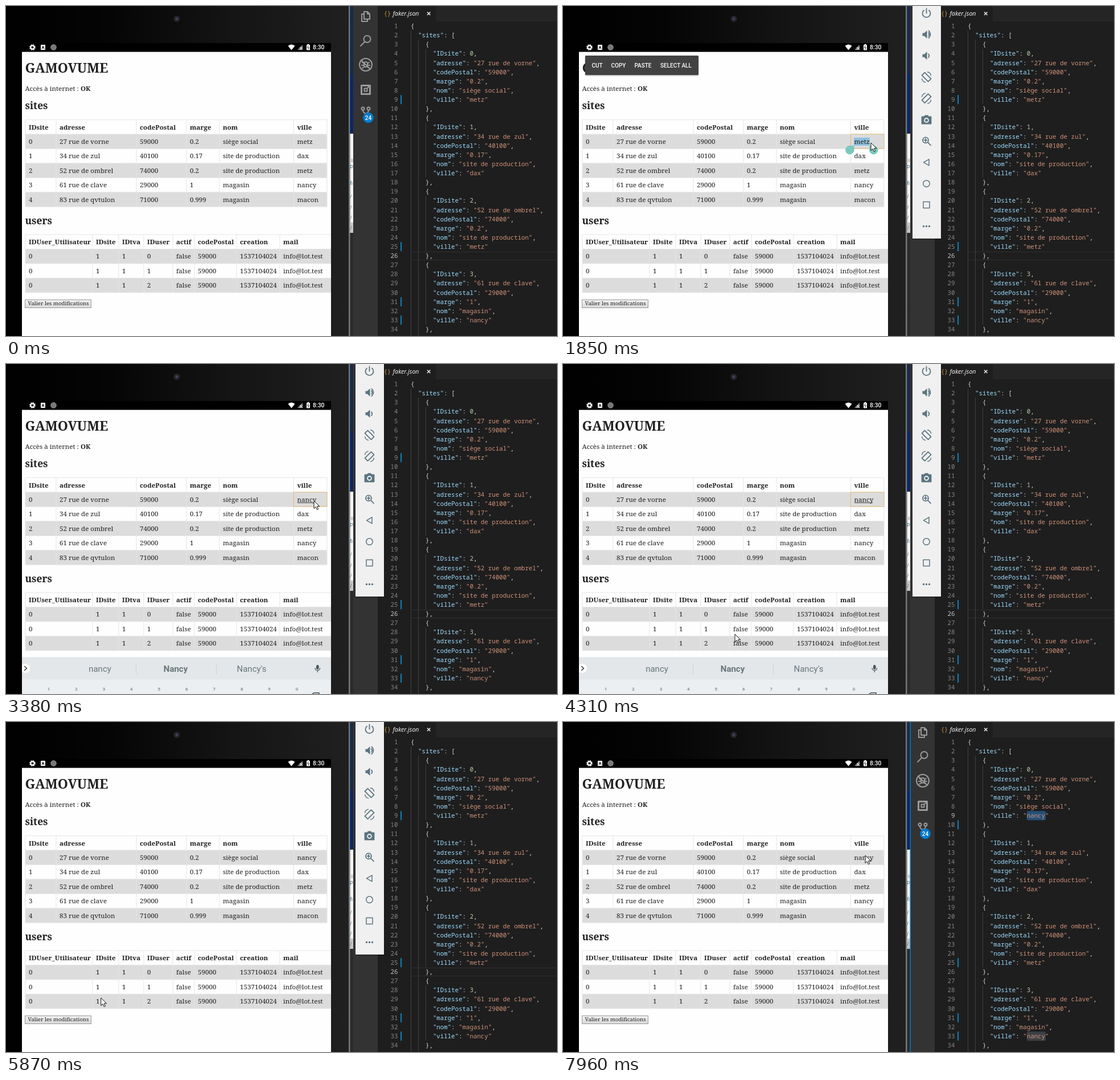
Animation, 968 px wide and 579 px high, one loop 8000 ms. Source, as an HTML page:

```html
<!DOCTYPE html>
<html lang="fr">
<head>
<meta charset="utf-8">
<title>Tablet and editor</title>
<style>
  html, body { margin: 0; width: 100%; height: 100%; overflow: hidden; background: #1e1e1e; }
  svg { display: block; width: 100vw; height: 100vh; }
  text { white-space: pre; }
  .serif { font-family: "Noto Serif", serif; font-size: 11.6px; fill: #212121; }
  .b { font-weight: 700; }
  .h1 { font-size: 23.2px; }
  .h2 { font-size: 17.4px; }
  .ui { font-family: Roboto, sans-serif; }
  .code { font-family: "Noto Sans Mono", monospace; font-size: 10.8px; font-weight: 500; fill: #d4d4d4; }
  .key { fill: #9cdcfe; }
  .str { fill: #ce9178; }
  .num { fill: #b5cea8; }
  .mid { text-anchor: middle; }
  .line { fill: none; stroke-linecap: round; stroke-linejoin: round; }
</style>
</head>
<body>
<svg id="stage" viewBox="0 0 968 579" preserveAspectRatio="none"></svg>
<script>
const DURATION = 8000;
const stage = document.getElementById('stage');
const CHAR = 6.48, LINE = 16.12;
const lineY = n => 35.3 + LINE * (n - 1);

const rect = (x, y, w, h, fill, extra = '') =>
  `<rect x="${x}" y="${y}" width="${w}" height="${h}" fill="${fill}" ${extra}/>`;
const text = (x, y, cls, body, extra = '') =>
  `<text x="${x}" y="${y}" class="${cls}" ${extra}>${body}</text>`;
const path = (d, extra = '') => `<path d="${d}" ${extra}/>`;
const group = (id, body, extra = '') => `<g id="${id}" ${extra}>${body}</g>`;
const at = (x, y, body) => `<g transform="translate(${x} ${y})">${body}</g>`;

const fields = ['IDsite', 'adresse', 'codePostal', 'marge', 'nom', 'ville'];
const sites = [
  [0, '27 rue de vorne', '59000', '0.2', 'siège social', 'metz'],
  [1, '34 rue de zul', '40100', '0.17', 'site de production', 'dax'],
  [2, '52 rue de ombrel', '74000', '0.2', 'site de production', 'metz'],
  [3, '61 rue de clave', '29000', '1', 'magasin', 'nancy'],
  [4, '83 rue de qvtulon', '71000', '0.999', 'magasin', 'macon']
];
const userFields = ['IDUser_Utilisateur', 'IDsite', 'IDtva', 'IDuser', 'actif', 'codePostal', 'creation', 'mail'];
const users = [0, 1, 2].map(i => [0, 1, 1, i, 'false', '59000', '1537104024', 'info@lot.test']);

function table(top, cols, head, rows, idOf = () => '') {
  const step = 25.45, right = cols[cols.length - 1], bottom = top + step * (rows.length + 1);
  let out = '';
  rows.forEach((_, i) => {
    if (i % 2 === 0) out += rect(cols[0], top + step * (i + 1), right - cols[0], step, '#dcdcdc');
  });
  const lines = cols.map(x => `M${x} ${top}V${bottom}`).join('') +
    [head, ...rows].map((_, i) => `M${cols[0]} ${top + step * i}H${right}`).join('') + `M${cols[0]} ${bottom}H${right}`;
  out += path(lines, 'fill="none" stroke="#e5e5e5"');
  [head, ...rows].forEach((row, r) => row.forEach((cell, c) => {
    out += text(cols[c] + 6, top + step * r + 17, r ? 'serif' : 'serif b', cell, idOf(r, c));
  }));
  return out;
}

function tablet() {
  const status =
    rect(28, 65, 543, 16, '#000') +
    at(46.5, 72.5, `<circle r="3.2" fill="none" stroke="#fff" stroke-width="2.2"/><circle r="4.6" fill="none" stroke="#fff" stroke-width="1.6" stroke-dasharray="2 1.6"/>`) +
    rect(61, 68, 8, 9, '#fff', 'rx="1"') + text(65, 75.3, 'ui b mid', 'A', 'font-size="7.5" fill="#000"') +
    `<circle cx="83.5" cy="72.5" r="4.8" fill="#777" stroke="#aaa" stroke-width=".8"/>` +
    path('M495.5 70Q501.5 65 507.5 70L501.5 77.500Z', 'fill="#fff"') +
    path('M521 68V77H512Z', 'fill="#888"') + path('M516 72l5 5m0-5l-5 5', 'stroke="#fff"') +
    rect(528, 68, 6, 9.5, '#fff', 'rx="1"') + rect(529.7, 66.8, 2.6, 2, '#fff') +
    path('M531.5 69.500l-2 3.500h3l-2 3.500', 'stroke="#000" fill="none" stroke-width=".8"') +
    text(539, 76.2, 'ui', '8:30', 'font-size="10.4" font-weight="500" fill="#fff"');

  const page =
    rect(28, 80.5, 543, 499, '#fefefe') +
    text(33.5, 117, 'serif b h1', 'GAMOVUME') +
    text(33.5, 148.5, 'serif', 'Accès à internet : <tspan class="b">OK</tspan>') +
    text(33.5, 181, 'serif b h2', 'sites') +
    table(199.5, [34, 88, 229, 317, 375, 505.5, 564], fields, sites,
      (r, c) => r === 1 && c === 5 ? 'id="city"' : '') +
    text(33.5, 382.5, 'serif b h2', 'users') +
    table(401, [34, 152, 198, 242, 293, 331, 405, 481, 620], userFields, users) +
    rect(33.5, 515.5, 116, 14, 'url(#button)', 'id="button-face" stroke="#999"') +
    text(38.5, 525.3, 'serif', 'Valier les modifications', 'style="font-size:9.6px"');

  const editing =
    group('focus', rect(505.5, 225, 58.5, 25, 'none', 'stroke="#e6b677"')) +
    group('underline', path('M512 243.500h32', 'stroke="#333" stroke-width=".9"')) +
    group('caret', rect(0, 231, 1.3, 14, '#222')) +
    group('handles', path('M511.500 245v8a7.700 7.700 0 1 1-7.700-8zM538 245v8a7.700 7.700 0 1 0 7.700-8z', 'fill="#7cc8bf"')) +
    group('popup', rect(39, 87, 199, 34, '#424242', 'rx="1.5" filter="url(#shadow)"') +
      [[50.5, 'CUT'], [84.5, 'COPY'], [125.5, 'PASTE'], [171, 'SELECT ALL']]
        .map(([x, s]) => text(x, 107.5, 'ui', s, 'font-size="10" font-weight="500" fill="#fff"')).join(''));

  return rect(0, 0, 602, 579, 'url(#gloss)') +
    `<circle cx="300" cy="22.500" r="5.500" fill="#25252c"/><circle cx="300" cy="22.500" r="2.200" fill="#42425e"/>` +
    status + `<g clip-path="url(#screen)">${group('select', '')}${page}${editing}${keyboard()}</g>`;
}

function keyboard() {
  const label = (x, s, weight) => text(x, 540, 'ui mid', s, `font-size="15" font-weight="${weight}" fill="#69757b"`);
  const letters = [...'qwertyuiop'].map((s, i) =>
    text(75 + i * 48.45, 572.5, 'ui mid', (i + 1) % 10, 'font-size="8" font-weight="500" fill="#778086"') +
    text(56 + i * 48.2, 592, 'ui mid', s, 'font-size="19" fill="#37474f"')).join('');
  return group('keyboard',
    rect(28, 512.5, 543, 3, '#1b1f21', 'id="edge"') + rect(28, 514.5, 543, 80, '#eceff1') +
    rect(28, 514.5, 543, 39, '#e3e7e9', 'id="bar"') +
    `<circle cx="34" cy="534" r="8" fill="#fff"/>` +
    path('M32.500 530.500l4 3.500-4 3.500', 'class="line" stroke="#333" stroke-width="1.500"') +
    rect(545, 528, 4.6, 8, '#4b555a', 'rx="2.3"') +
    path('M543 533.500a4.300 4.300 0 0 0 8.600 0M547.300 538v2.500', 'class="line" stroke="#4b555a" stroke-width="1.200"') +
    group('hints', label(165, 'nancy', 400) + label(298, 'Nancy', 700) + label(431.5, "Nancy's", 400) +
      path('M228.500 526v18M369.500 526v18', 'stroke="#cdd3d6"')) +
    letters + path('M541 577h9v7h-9l-5-3.500z', 'class="line" stroke="#37474f" stroke-width="1.500"'));
}

function background() {
  const scraps = [['P', 286], ['fi', 314], ['/', 338], ['/', 357], ['/', 375], ['/', 393]]
    .map(([s, y]) => text(604, y, 'ui', s, 'font-size="9" fill="#4b7787"')).join('');
  return rect(600, 0, 12, 579, '#2b2b2d') + rect(602, 0, 2.5, 579, '#77777a') +
    rect(604.5, 0, 5, 120, '#172b4b') + rect(604.5, 120, 5, 103, '#08286b') +
    rect(604.5, 224, 5.5, 174, '#f3f3f3') + rect(604.5, 268, 5.5, 6, '#d0d0d0') +
    rect(604.5, 380, 5.5, 18, '#c6c6c6') + scraps;
}

function activityBar() {
  const icons =
    at(632, 18, path('M-3-8h6l4 4v9h-10zM-3-4h-4v13h10V5M3-8v4h4')) +
    at(632, 61, `<circle cx="2.500" cy="-3" r="6"/>` + path('M-2 2l-7 7')) +
    at(632, 103, `<circle r="11"/>` + path('M-8-8L8 8M-3-3a3.500 4 0 0 1 6 0v5a3.500 4 0 0 1-6 0zM-6-4l3 2M-7 1h4M-6 6l3-2M6-4L3-2M7 1H3M6 6L3 4')) +
    at(632, 147, path('M-7.500-7.500h15v15h-15z', 'stroke-width="3"') + path('M-2.500-2.500h5v5h-5zM3-3l4-4')) +
    at(632, 185, `<circle cx="-5" cy="-5" r="2.500"/><circle cx="5" cy="-5" r="2.500"/>` + path('M-5-2Q-5 2 0 4Q5 2 5-2M0 4v6'));
  return rect(610, 0, 43, 579, '#333') +
    `<g class="line" stroke="#9a9a9a" stroke-width="2">${icons}</g>` +
    `<circle cx="636.500" cy="196" r="9.300" fill="#007acc"/>` +
    text(636.5, 199.7, 'ui mid', 24, 'font-size="10" font-weight="500" fill="#fff"') +
    group('border', rect(609.5, 0, 1.5, 579, '#0078c8'));
}

function editor() {
  const lines = [[0, '{'], [2, '<tspan class="key">"sites"</tspan>: [']];
  for (const site of sites.slice(0, 4)) {
    lines.push([4, '{']);
    fields.forEach((name, i) => {
      const value = i ? `"${site[i]}"` : site[i];
      lines.push([6, `<tspan class="key">"${name}"</tspan>: <tspan class="${i ? 'str' : 'num'}">${value}</tspan>${i < 5 ? ',' : ''}`]);
    });
    lines.push([4, '},']);
  }
  const word = n => [815, lineY(n) - 8, 33, 16];
  const marks = [25, 31, 33].map(n => rect(693, lineY(n) - 8, 2.2, 16, '#147aab')).join('') +
    rect(693, 0, 2.2, 16, '#147aab', 'id="mark"');
  const guides = 'M711.500 43V579M724.500 59V579' +
    [3, 11, 19, 27].map(n => `M737.500 ${lineY(n) + 8}v${LINE * 6}`).join('');
  return rect(653, 0, 315, 579, '#1e1e1e') + rect(755, 0, 213, 27, '#252526') +
    text(664, 16.5, 'code', '{}', 'style="fill:#d59b43;font-size:10px"') +
    text(679.5, 17, '', 'faker.json', 'font-family="Open Sans, sans-serif" font-style="italic" font-size="10.7" fill="#fff"') +
    path('M740 10.500l5.500 5.500m0-5.500l-5.500 5.500', 'stroke="#eee" stroke-width="1.500"') +
    group('active', path('M711 431.500H968M711 445.500H968', 'stroke="#303030"')) +
    group('match', rect(...word(9), '#264f78', 'rx="2"') + rect(...word(33), '#3c4044', 'rx="2"')) +
    path(guides, 'stroke="#404040" fill="none"') + marks +
    lines.map(([indent, body], i) =>
      text(688.5, lineY(i + 1) + 3.8, 'code', i + 1, `id="n${i + 1}" text-anchor="end" style="fill:#858585"`) +
      text(711 + indent * CHAR, lineY(i + 1) + 3.8, 'code', body, `id="line${i + 1}"`)).join('');
}

function emulatorBar() {
  const phone = side => path('M-3-8L8 3 3 8-8-3z', `transform="scale(${side} 1)"`) +
    path('M-8 3q1 5 6 6M8-3q-1-5-6-6', `transform="scale(${side} 1)" stroke-width="1.400"`);
  const speaker = path('M-7-2.500h3L1-7V7l-5-4.500h-3z', 'fill="#5b7480" stroke="none"');
  const icons = [
    path('M-4.500-5a7 7 0 1 0 9 0M0-8v8'),
    speaker + path('M3.500-3q2.500 3 0 6M4-6.500q6 6.500 0 13'),
    speaker + path('M3.500-3q2.500 3 0 6'),
    phone(1), phone(-1),
    path('M-8-5h4l2-2h4l2 2h4V7H-8z', 'fill="#5b7480"') + `<circle cy="1" r="3.500" stroke="#f0f0f0"/>`,
    `<circle cx="-1.500" cy="-1.500" r="5"/>` + path('M2.500 2.500l5 5M-4-1.500h5M-1.500-4v5'),
    path('M4.500-5.500v11l-9.500-5.500z', 'stroke-width="1.500"'),
    `<circle r="5.800" stroke-width="1.500"/>`,
    path('M-5.500-5.500h11v11h-11z', 'stroke-width="1.500"'),
    path('M-5 0h0M0 0h0M5 0h0', 'stroke-width="3.400"')
  ];
  return group('emulator', rect(614, -3, 50, 411, '#f0f0f0', 'filter="url(#shadow)"') +
    `<g class="line" stroke="#5b7480" stroke-width="1.800">${icons.map((icon, i) => at(638.5, 12.5 + i * 37.4, icon)).join('')}</g>`);
}

stage.innerHTML = `<defs>
  <linearGradient id="gloss">
    <stop offset="0" stop-color="#000"/><stop offset=".3" stop-color="#050505"/>
    <stop offset=".65" stop-color="#141414"/><stop offset="1" stop-color="#202020"/></linearGradient>
  <linearGradient id="button" x2="0" y2="1"><stop stop-color="#f2f2f2"/><stop offset="1" stop-color="#d8d8d8"/></linearGradient>
  <filter id="shadow" x="-10%" y="-10%" width="120%" height="130%"><feDropShadow dx="0" dy="1" stdDeviation="1.2" flood-opacity=".4"/></filter>
  <clipPath id="screen"><rect x="28" y="80" width="543" height="499"/></clipPath></defs>` +
  background() + activityBar() + editor() + tablet() + emulatorBar() +
  group('arrow', path('M0 0V13.500L3.200 10.600 5.500 15.600 7.700 14.600 5.500 9.800H9.800Z', 'fill="#fff" stroke="#111"')) +
  group('beam', path('M-2.500-6.500H-.5L0-6 .5-6.500H2.500M0-6V6M-2.500 6.500H-.5L0 6 .5 6.500H2.500', 'stroke="#e6e6e6" fill="none"'));

const $ = Object.fromEntries([...stage.querySelectorAll('[id]')].map(node => [node.id, node]));

// The selection sits above the grey row but under the word.
$.select.innerHTML = rect(511, 231, 28, 14, '#8fc1dc');
$.city.before($.select);

const pointer = [
  [130, 748, 560], [500, 640, 390], [900, 521, 244], [980, 528, 235], [1060, 532, 231],
  [1380, 532, 231], [1540, 541, 240], [3610, 541, 240], [3900, 450, 330], [4310, 302, 474],
  [4620, 302, 474], [4920, 102, 543], [5090, 102, 543], [5390, 106, 524],
  [5560, 104, 522], [5620, 100, 519], [5790, 102, 517], [6200, 430, 350], [6580, 844, 152],
  [6800, 840, 163], [7200, 840, 163], [7550, 700, 190], [7960, 531, 234], [8000, 531, 234]
];
const slide = [[2160, 62], [2310, 3], [2400, 0], [4400, 0], [4460, 30], [4540, 65]];

function sample(track, t) {
  const i = track.findIndex(key => key[0] > t);
  if (i < 1) return track[i ? track.length - 1 : 0].slice(1);
  const a = track[i - 1], b = track[i], k = (t - a[0]) / (b[0] - a[0]);
  return a.slice(1).map((v, n) => v + (b[n + 1] - v) * k);
}

const shown = {
  emulator: [750, 6870], focus: [850, 4460], select: [1210, 2450], handles: [1380, 2450],
  popup: [1850, 2450], keyboard: [2160, 4540], edge: [2160, 2400], hints: [2840, 4540],
  underline: [2840, 4460], caret: [2450, 3380], border: [6870, 8000],
  active: [0, 6870], match: [7120, 8000]
};

const setText = (node, value) => { if (node.textContent !== value) node.textContent = value; };
const show = (node, on) => node.setAttribute('visibility', on ? 'visible' : 'hidden');

function render(t) {
  for (const id in shown) show($[id], t >= shown[id][0] && t < shown[id][1]);

  const typed = Math.min(5, Math.floor((t - 2450) / 98) + 1);
  setText($.city, typed > 0 ? 'nancy'.slice(0, typed) : 'metz');
  $.caret.setAttribute('transform', `translate(${512 + $.city.getComputedTextLength()} 0)`);
  $.keyboard.setAttribute('transform', `translate(0 ${sample(slide, t)[0]})`);
  $.bar.setAttribute('fill', t < 2450 ? '#dadfe2' : '#e3e7e9');
  $['button-face'].setAttribute('fill', t >= 5560 && t < 5700 ? '#c4c4c4' : 'url(#button)');

  const saved = t >= 5950;
  setText($.line9.querySelector('.str'), saved ? '"nancy"' : '"metz"');
  $.mark.setAttribute('y', lineY(saved ? 10 : 9) - 8);
  $.n9.style.fill = t >= 6870 ? '#c6c6c6' : '#858585';
  $.n26.style.fill = t < 6870 ? '#c6c6c6' : '#858585';

  const [x, y] = sample(pointer, t);
  const overCode = x > 664;
  show($.arrow, t >= 130 && !overCode);
  show($.beam, t >= 130 && overCode);
  for (const node of [$.arrow, $.beam]) node.setAttribute('transform', `translate(${x} ${y})`);
}

const start = performance.now();
function frame() {
  render((performance.now() - start) % DURATION);
  requestAnimationFrame(frame);
}
frame();
</script>
</body>
</html>
```
